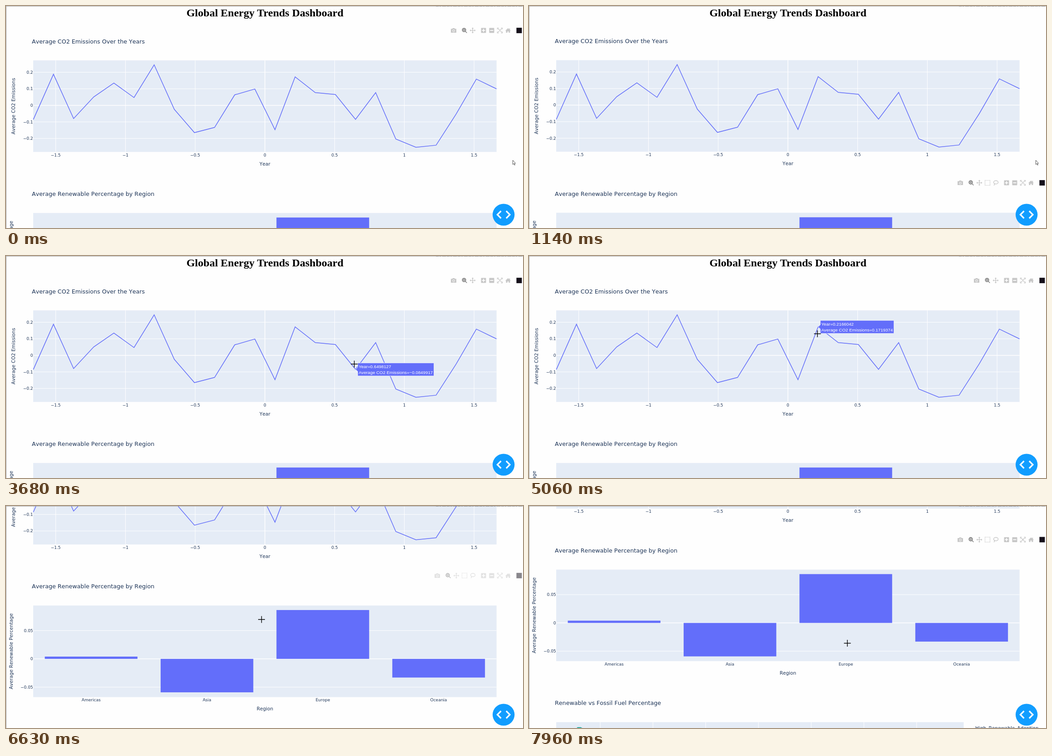
Recreate the animation shown at these times as an HTML page. Size 1140 by 491 pixels, loop 8000 ms.

```html
<!DOCTYPE html>
<html lang="en">
<head>
<meta charset="utf-8">
<title>Dashboard</title>
<style>
html, body { margin: 0; width: 100%; height: 100%; overflow: hidden; background: #fefefe; }
svg { display: block; }
text { font-family: "DejaVu Sans", Verdana, sans-serif; font-kerning: none; fill: #1e3558; }
.heading { font: bold 24px "Liberation Serif", "Times New Roman", serif; fill: #000; }
.title { font-size: 12.68px; }
.label { font-size: 10.5px; }
.tick { font-size: 9px; }
.tip { font: 9.75px "Liberation Sans", Arial, sans-serif; fill: #fff; }
.stroke { fill: none; stroke: currentColor; stroke-width: 1.4; }
.solid { fill: currentColor; }
.sign { stroke: #fff; stroke-width: 1.8; }
</style>
</head>
<body>
<svg id="stage" width="1140" height="491" viewBox="0 0 1140 491"></svg>
<script>
const LOOP = 8000;
const LEFT = 60, RIGHT = 1081.7, PLOT_H = 202.5;
const BLUE = '#636efa', PLOT = '#e5ecf6';
const stage = document.getElementById('stage');
const chartTop = index => 45.3 + index * 337.5;
const plotTop = index => chartTop(index) + 75;

function add(parent, tag, attrs = {}, text) {
  const node = document.createElementNS(stage.namespaceURI, tag);
  for (const key in attrs) node.setAttribute(key, attrs[key]);
  if (text !== undefined) node.textContent = text;
  parent.append(node);
  return node;
}
const label = (parent, cls, x, y, text, anchor = 'middle') =>
  add(parent, 'text', { class: cls, x, y, 'text-anchor': anchor }, text);
const line = (parent, x1, y1, x2, y2, width = 1) =>
  add(parent, 'line', { x1, y1, x2, y2, stroke: '#fff', 'stroke-width': width });
const rect = (parent, x, y, width, height, fill) =>
  add(parent, 'rect', { x, y, width, height, fill });
const signed = n => String(n).replace('-', '−');

const page = add(stage, 'g');
label(page, 'heading', 571, 23, 'Global Energy Trends Dashboard');

function chart(index, title, right = RIGHT) {
  label(page, 'title', 57, chartTop(index) + 37.2, title, 'start');
  rect(page, LEFT, plotTop(index), right - LEFT, PLOT_H, PLOT);
}
function axisTitles(index, xTitle, yTitle, yTitleX) {
  const mid = plotTop(index) + PLOT_H / 2;
  label(page, 'label', 570.9, chartTop(index) + 307.4, xTitle);
  label(page, 'label', 0, 0, yTitle)
    .setAttribute('transform', `translate(${yTitleX} ${mid}) rotate(-90)`);
}
function rowTick(y, value) {
  line(page, LEFT, y, RIGHT, y, value ? 1 : 1.5);
  label(page, 'tick', 59.6, y + 3.2, signed(value), 'end');
}

// Line chart
const emissions = [
  -0.086, 0.188, -0.08, 0.051, 0.1345, 0.047, 0.245, -0.024, -0.165, -0.1335, 0.0634, 0.0985639,
  -0.1471826, 0.1719374, 0.0768143, 0.0654928, -0.0849917, 0.0771652, -0.2035, -0.2535, -0.241,
  -0.052, 0.1585, 0.0995];
const points = emissions.map((value, i) => {
  const year = (i - 11.5) * 0.14440282;
  return { year, value, x: 570.9 + year * 307.5, y: 219.7 - value * 366 };
});
chart(0, 'Average CO2 Emissions Over the Years');
for (let i = -3; i <= 3; i++) {
  const x = 570.9 + i * 153.75;
  line(page, x, plotTop(0), x, plotTop(0) + PLOT_H, i ? 1 : 1.5);
  label(page, 'tick', x, 332.6, signed(i / 2));
}
for (let i = -2; i <= 2; i++) rowTick(219.7 - i * 36.6, i / 10);
add(page, 'polyline', {
  points: points.map(p => `${p.x},${p.y}`).join(' '),
  fill: 'none', stroke: BLUE, 'stroke-width': 1.5
});
axisTitles(0, 'Year', 'Average CO2 Emissions', 20.3);

// Bar chart
chart(1, 'Average Renewable Percentage by Region');
const zeroY = 575.8, pitch = (RIGHT - LEFT) / 4;
for (let i = -1; i <= 1; i++) rowTick(zeroY - i * 62.5, i / 20);
const regions = { Americas: 5, Asia: -74, Europe: 108, Oceania: -41.3 };
Object.entries(regions).forEach(([name, height], i) => {
  const mid = LEFT + pitch * (i + 0.5);
  rect(page, mid - pitch * 0.4, zeroY - Math.max(height, 0), pitch * 0.8, Math.abs(height), BLUE);
  label(page, 'tick', mid, 670, name);
});
axisTitles(1, 'Region', 'Average Renewable Percentage', 15);

// Top of the third chart
chart(2, 'Renewable vs Fossil Fuel Percentage', 958.5);
for (let x = 157; x < 900; x += 116.3) line(page, x, plotTop(2), x, plotTop(2) + PLOT_H);
add(page, 'path', { d: 'M103 810L107 806.5H114L124 811Z', fill: '#17a398' });
label(page, 'label', 984, 812.5, 'High_Renewable_Adoption', 'start');

// Toolbars
const path = (cls, d) => `<path class="${cls}" d="${d}"/>`;
const square = '<rect class="solid" x="-5.5" y="-5.5" width="11" height="11" rx="1"/>';
const icons = {
  camera: path('solid', 'M-6-3.5h3l1-1.5h4l1 1.5h3v8.5h-12z') +
    '<circle cy=".7" r="2.3" class="solid" style="stroke:#fff"/>',
  zoom: '<circle cx="-1" cy="-1" r="3.6" class="stroke" style="stroke-width:2"/>' +
    path('stroke', 'M1.8 1.8L5.3 5.3M-3-1h4M-1-3v4'),
  pan: path('stroke', 'M-5 0H5M0-5V5M-4-1.5L-5.5 0L-4 1.5M4-1.5L5.5 0L4 1.5M-1.5-4L0-5.5L1.5-4M-1.5 4L0 5.5L1.5 4'),
  select: '<rect class="stroke" x="-5.5" y="-5.5" width="11" height="11" stroke-dasharray="1.7 1.44"/>',
  lasso: '<ellipse class="stroke" cx=".5" cy="-1.2" rx="5" ry="3.7"/>' +
    path('stroke', 'M-3 1.5q2 1.5-1 4'),
  plus: square + path('sign', 'M-3.5 0h7M0-3.5v7'),
  minus: square + path('sign', 'M-3.5 0h7'),
  fit: path('stroke', 'M-4-4L4 4M4-4L-4 4M-5.5-2.5v-3h3M2.5-5.5h3v3M5.5 2.5v3h-3M-2.5 5.5h-3v-3'),
  home: path('solid', 'M-6 .5L0-5l2.5 2.3V-4.5h1.7v3.2L6 .5H4.5V5H1.2V1.8h-2.4V5h-3.3V.5z')
};
// Icons are laid out from the right, with a small gap between groups.
function toolbar(index, dragTools) {
  const bar = add(page, 'g', { transform: `translate(0 ${chartTop(index) + 8.8})` });
  let x = 1107;
  for (const group of ['home fit minus plus', dragTools, 'camera']) {
    for (const name of group.split(' ')) {
      const color = name === 'zoom' ? '#7c7c7c' : '#c7c7c7';
      add(bar, 'g', { transform: `translate(${x} 0)`, color }).innerHTML = icons[name];
      x -= 18;
    }
    x -= 6;
  }
  rect(bar, 1125.5, -6, 12, 12, '#15101a');
  return bar;
}
const bars = [toolbar(0, 'pan zoom'), toolbar(1, 'lasso select pan zoom')];

// Tooltip
const tip = add(stage, 'g');
const tipBox = add(tip, 'path', { fill: BLUE, stroke: '#fff', 'stroke-width': 0.75 });
const tipLines = [-2.9, 9.9].map(y => label(tip, 'tip', 7, y, '', 'start'));
let shown = null;
function showTip(point) {
  tip.style.display = point ? '' : 'none';
  if (!point || point === shown) return;
  shown = point;
  tipLines[0].textContent = 'Year=' + signed(Number(point.year.toPrecision(7)));
  tipLines[1].textContent = 'Average CO2 Emissions=' + signed(point.value);
  const width = Math.max(...tipLines.map(t => t.getComputedTextLength())) + 4.6;
  tipBox.setAttribute('d', `M0 0L4.8-4.5V-14.2h${width}V14.4H4.8V4.5Z`);
  tip.setAttribute('transform', `translate(${point.x} ${point.y})`);
}

// Fixed overlay
add(stage, 'circle', { cx: 1097.2, cy: 461.6, r: 24.2, fill: '#119dff' });
add(stage, 'path', {
  d: 'M1091.5 453.5l-8 8l8 8M1103 453.5l8 8l-8 8',
  fill: 'none', stroke: '#fff', 'stroke-width': 3.2
});
add(stage, 'path', { d: 'M0 .5H1140M.5 0V491', stroke: '#a9a9a9', fill: 'none' });
add(stage, 'path', { d: 'M948 .5H1138', stroke: '#808080', 'stroke-dasharray': '6 2 3 3 8 2' });
const cross = add(stage, 'path', { d: 'M-7.5 0H7.5M0-7.5V7.5', stroke: '#000', 'stroke-width': 1.4 });
const arrow = add(stage, 'path', {
  d: 'M-1.5-5V4.5L.7 2.5L2.2 6L3.5 5.4L2 2H4.5Z',
  fill: '#fff', stroke: '#444', 'stroke-width': 0.9
});

// The screen refreshes about every 135 ms, and only during these spans.
const busy = [
  [150, 1140], [1290, 2330], [2450, 3220], [3680, 4590], [4740, 4740],
  [5060, 6090], [6240, 6630], [6780, 7200], [7320, 7960]];
function refreshTime(time) {
  const span = busy.findLast(([from]) => from <= time);
  if (!span) return 0;
  const [from, to] = span;
  const step = (to - from) / Math.max(1, Math.round((to - from) / 135));
  return time >= to ? to : from + Math.floor((time - from) / step) * step;
}

// Each glide is [start, end, amount] and slows down towards its end.
const wheel = [[100, 430, 158.5], [583, 1173, -158.5], [6190, 6630, 237.7], [7270, 7960, 79.5]];
const toolbarSwap = [[300, 575, 1], [1290, 1575, -1], [6500, 6944, 1]];
const glide = (moves, t) => moves.reduce((sum, [start, end, amount]) => {
  const p = Math.min(1, Math.max(0, (t - start) / (end - start)));
  return sum + amount * (1 - (1 - p) ** 2);
}, 0);

const pointerPath = [
  [0, 1119, 346], [1290, 1119, 346], [1810, 1000, 290], [2330, 826, 198], [3220, 777, 237],
  [3680, 768, 239], [4590, 645, 155], [5060, 636, 172], [5600, 591, 267], [6090, 553, 188.5],
  [6630, 563.5, 251], [7960, 702, 303.5], [LOOP, 702, 303.5]];
function pointerAt(t) {
  const next = pointerPath.findIndex(([time]) => time > t);
  const [t0, x0, y0] = pointerPath[next - 1], [t1, x1, y1] = pointerPath[next];
  const p = (t - t0) / (t1 - t0);
  return [x0 + (x1 - x0) * p, y0 + (y1 - y0) * p];
}

function draw(time) {
  const t = refreshTime(time);
  const scroll = glide(wheel, t);
  const [x, y] = pointerAt(t);
  page.setAttribute('transform', `translate(0 ${-scroll})`);

  const swap = glide(toolbarSwap, t);
  bars[0].style.opacity = 1 - swap;
  bars[1].style.opacity = swap;

  const distance = p => Math.hypot(p.x - x, p.y - y);
  const nearest = points.reduce((a, b) => distance(b) < distance(a) ? b : a);
  showTip(scroll < 0.1 && distance(nearest) < 20 ? nearest : null);

  const inPlot = x > LEFT && x < RIGHT && [0, 1].some(index => {
    const depth = y + scroll - plotTop(index);
    return depth > 0 && depth < PLOT_H;
  });
  cross.style.display = inPlot ? '' : 'none';
  arrow.style.display = inPlot ? 'none' : '';
  for (const shape of [cross, arrow]) shape.setAttribute('transform', `translate(${x} ${y})`);
}

const start = performance.now();
function tick() {
  draw((performance.now() - start) % LOOP);
  requestAnimationFrame(tick);
}
tick();
</script>
</body>
</html>
```
